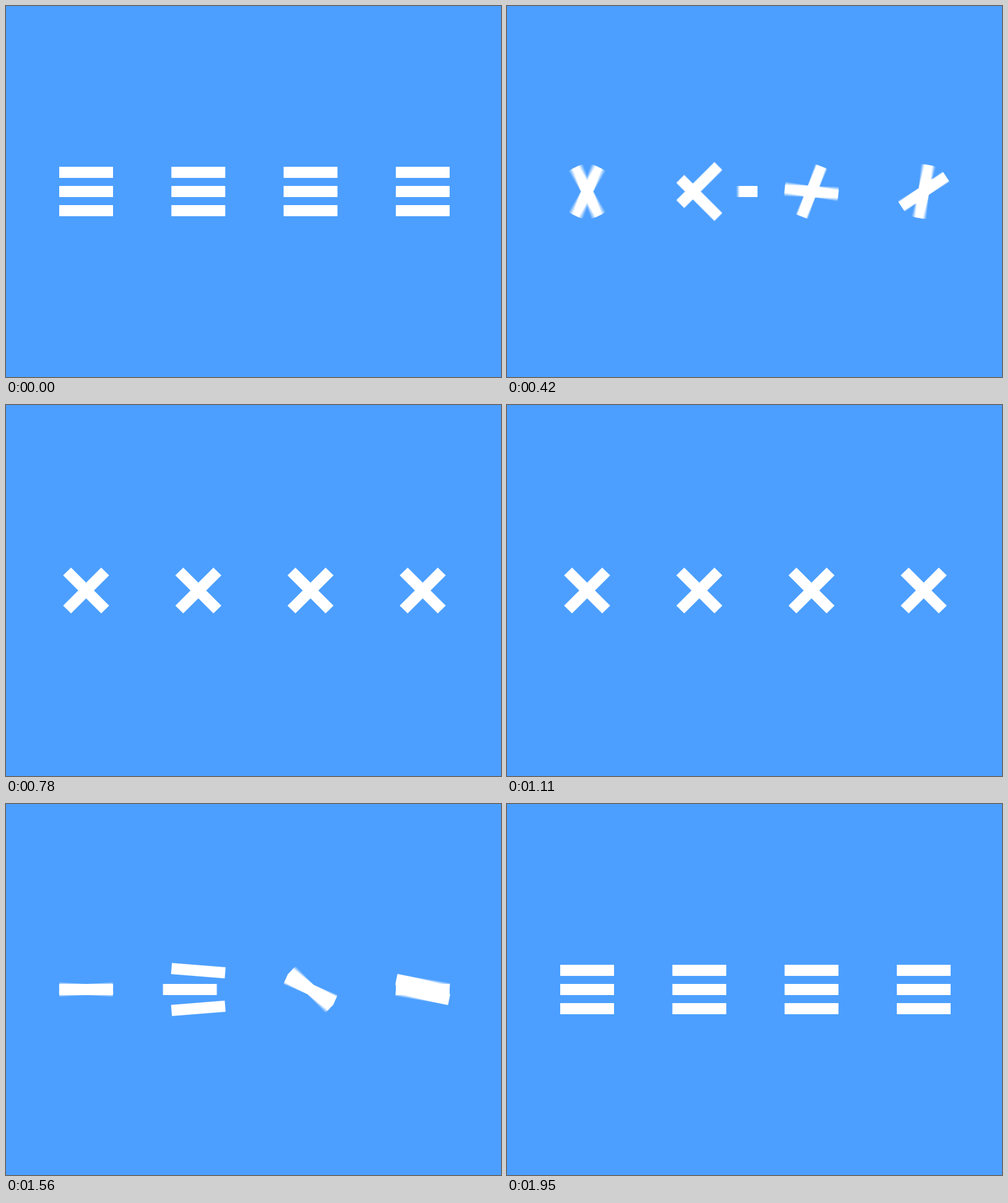
Write an HTML page with a canvas that moves like this. It is 800 px wide and 600 px high and loops after 2700 ms.

```html
<!DOCTYPE html>
<html lang="en">
<head>
<meta charset="utf-8">
<title>Menu icons</title>
<style>
  html, body { margin: 0; width: 100%; height: 100%; overflow: hidden; background: #4c9fff; }
  canvas { display: block; width: 800px; height: 600px; }
</style>
</head>
<body>
<canvas id="stage" width="800" height="600"></canvas>
<script>
const ctx = document.getElementById('stage').getContext('2d');
const STEP = 30, LOOP = 2700, CLOSE_AT = 36;   // step in ms, the closing half starts at step 36
const W = 87, H = 18, GAP = 31;
const TRAVEL = W + Math.PI * GAP / 2;          // way of a bar round the bend
const SAMPLES = 15, SHUTTER = 0.5;             // motion blur
const RAD = Math.PI / 180;

const span = (f, a, b) => Math.min(1, Math.max(0, (f - a) / (b - a)));
const smooth = (f, a, b) => { const u = span(f, a, b); return u * u * (3 - 2 * u); };

// cubic-bezier(.2, 0, .2, 1)
function swift(f, a, b) {
  const u = span(f, a, b);
  if (u === 0 || u === 1) return u;
  let lo = 0, hi = 1;
  for (let i = 0; i < 20; i++) {
    const t = (lo + hi) / 2;
    if (0.6 * t * (1 - t) + t * t * t < u) lo = t; else hi = t;
  }
  return lo * lo * (3 - 2 * lo);
}

// All bars of one icon go into one path, so overlaps count once.
function bars(list) {
  ctx.beginPath();
  for (const [y, deg] of list) {
    ctx.save();
    ctx.translate(0, y);
    ctx.rotate(deg * RAD);
    ctx.rect(-W / 2, -H / 2, W, H);
    ctx.restore();
  }
  ctx.fill();
}

// A bar that runs along a U-turn from the outer row into the middle row.
function slide(dist, flip, alpha) {
  if (alpha <= 0) return;
  ctx.save();
  if (flip) ctx.rotate(Math.PI);
  ctx.globalAlpha *= alpha;
  ctx.lineWidth = H;
  ctx.setLineDash([W, 1000]);
  ctx.lineDashOffset = -dist;
  ctx.beginPath();
  ctx.moveTo(W / 2, -GAP);
  ctx.lineTo(-W / 2, -GAP);
  ctx.arc(-W / 2, -GAP / 2, GAP / 2, -Math.PI / 2, Math.PI / 2, true);
  ctx.lineTo(W / 2, 0);
  ctx.stroke();
  ctx.restore();
}

function bend(f, closing, mid) {
  if (closing) {
    const a = 90 * (1 - smooth(f, 9, 16.7)) + 45 * (1 - smooth(f, 7.3, 15.7));
    const way = t => TRAVEL * (1 - smooth(t, 16, 28.5));
    if (f < 16) {
      bars(f < 15.6 ? [[0, a], [0, -a]] : [[0, a], [0, -a], [0, 0]]);
    } else {
      bars([[0, 0]]);
      slide(way(f), false, 1);
      slide(way(f), true, 1);
    }
  } else if (f < 10.4) {
    const way = t => TRAVEL * smooth(t, 2.4, 12.6);
    const alpha = 1 - span(mid, 8.4, 9.9);
    bars([[0, 0]]);
    slide(way(f), false, alpha);
    slide(way(mid), true, alpha);
  } else {
    const a = 90 * smooth(f, 10.4, 18) + 45 * swift(f, 9.3, 26);
    bars([[0, a], [0, -a]]);
  }
}

function arrow(f, closing) {
  let y, a, x;
  if (closing) {
    y = GAP * swift(f, 2.8, 18.8);
    a = 45 + 135 * swift(f, 2.8, 20.1);
    x = -137.5 * (1 - swift(f, 2.2, 24.6));
  } else {
    y = GAP * (1 - smooth(f, 8.5, 17.5));
    a = 45 * smooth(f, 5, 12);
    x = 137.5 * smooth(f, 4, 18.5);
  }
  bars([[-y, -a], [y, a]]);
  // the shaft is cut off at both sides of its window
  const l = Math.max(-94, x - W / 2), r = Math.min(94, x + W / 2);
  if (r > l) ctx.fillRect(l, -H / 2, r - l, H);
}

function spin(f, closing) {
  const turn = closing ? 1 - smooth(f, 5.5, 20) : smooth(f, 3, 18);
  const y = GAP * (closing ? swift(f, 16.5, 29) : 1 - smooth(f, 0, 8.5));
  bars([[-y, 225 * turn], [0, 135 * turn], [y, 135 * turn]]);
}

function fold(f, closing) {
  const y = GAP * (closing ? swift(f, 13.5, 28.5) : 1 - swift(f, 0, 12.8));
  const g = closing ? 90 + 90 * smooth(f, 9, 18) : 90 * smooth(f, 8.3, 18);
  const open = 45 * (closing ? 1 - smooth(f, 7, 15.5) : swift(f, 9.3, 26));
  const list = [[-y, -g - open], [y, -g + open]];
  if (closing ? f > 15.5 : f < 9.5) list.push([0, 0]);
  bars(list);
}

const icons = [bend, arrow, spin, fold];

function draw(step) {
  const closing = step >= CLOSE_AT;
  const mid = closing ? step - CLOSE_AT : step;
  ctx.setTransform(1, 0, 0, 1, 0, 0);
  ctx.clearRect(0, 0, 800, 600);
  ctx.globalCompositeOperation = 'lighter';
  ctx.fillStyle = ctx.strokeStyle = '#fff';
  for (let i = 0; i < SAMPLES; i++) {
    const f = mid + SHUTTER * ((i + 0.5) / SAMPLES - 0.5);
    icons.forEach((icon, n) => {
      ctx.setTransform(1, 0, 0, 1, 129.5 + n * 544 / 3, 300);
      ctx.globalAlpha = 1 / SAMPLES;
      icon(f, closing, mid);
    });
  }
}

let last = -1;
function tick() {
  const step = Math.floor(performance.now() % LOOP / STEP);
  if (step !== last) draw(last = step);
  requestAnimationFrame(tick);
}
tick();
</script>
</body>
</html>
```
